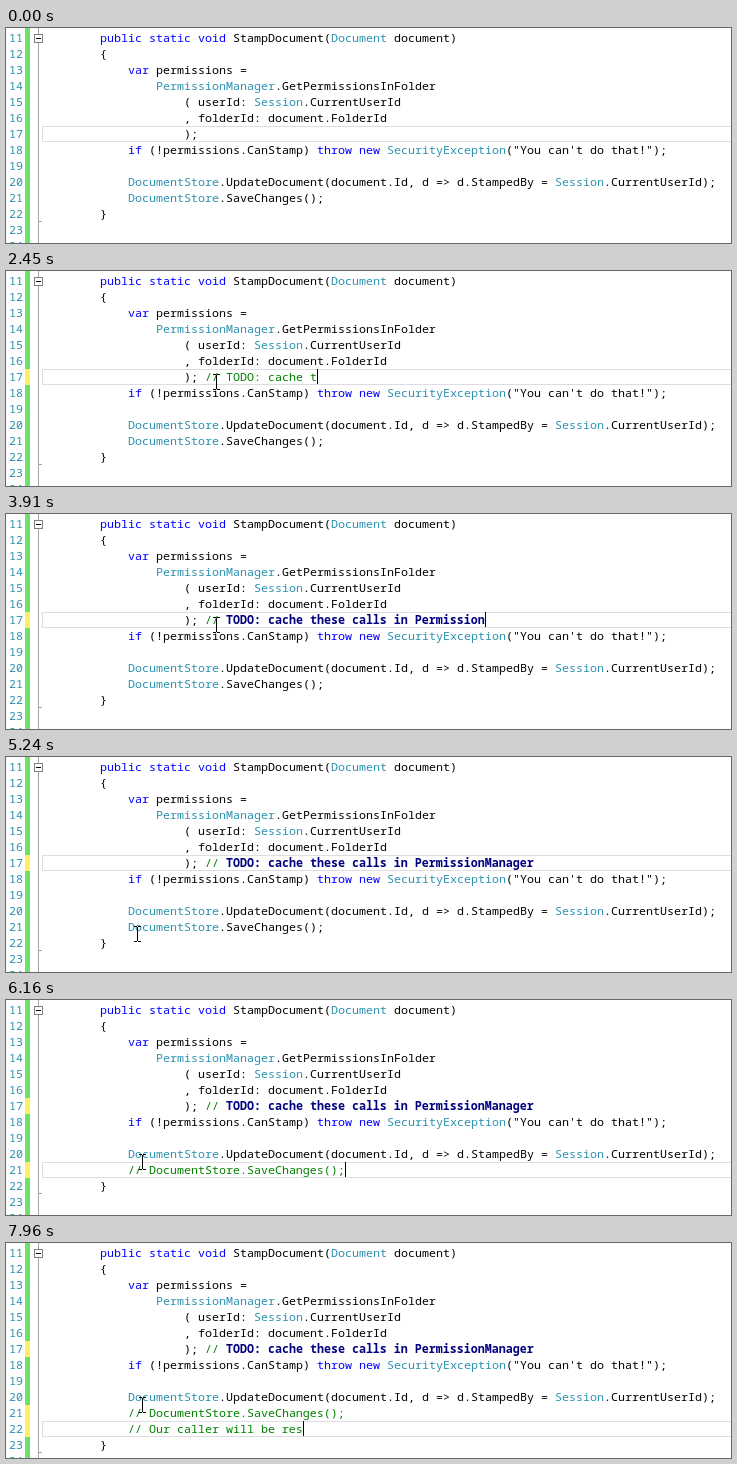
An HTML page with a canvas for the animation above (8000 ms loop, 725x215 px).

```html
<!DOCTYPE html>
<html lang="en">
<head>
<meta charset="utf-8">
<title>Code editor</title>
<style>
html, body { margin: 0; width: 100%; height: 100%; overflow: hidden; background: #fff; }
canvas { display: block; }
</style>
</head>
<body>
<canvas width="725" height="215"></canvas>
<script>
const ctx = document.querySelector('canvas').getContext('2d');
const LOOP = 8000, CHAR = 7, ROW = 16, LEFT = 38, TOP = 2;
const FONT = '11.667px "Noto Sans Mono", "DejaVu Sans Mono", monospace';
const TEAL = '#2b91af', BLUE = '#0000ff', GREEN = '#008000', NAVY = '#000080';

const COLORS = {};
for (const word of 'public static void var if throw new'.split(' ')) COLORS[word] = BLUE;
for (const word of 'Document PermissionManager Session SecurityException DocumentStore'.split(' ')) COLORS[word] = TEAL;

// [column, code], from line 11 on
const CODE = [
  [8, 'public static void StampDocument(Document document)'],
  [8, '{'],
  [12, 'var permissions ='],
  [16, 'PermissionManager.GetPermissionsInFolder'],
  [20, '( userId: Session.CurrentUserId'],
  [20, ', folderId: document.FolderId'],
  [20, ');'],
  [12, 'if (!permissions.CanStamp) throw new SecurityException("You can\'t do that!");'],
  [12, ''],
  [12, 'DocumentStore.UpdateDocument(document.Id, d => d.StampedBy = Session.CurrentUserId);'],
];
const SAVE = 'DocumentStore.SaveChanges();';
const TODO = ' // TODO: cache these calls in PermissionManager';
const NOTE = '// Our caller will be res';
const TODO_ROW = 6, SAVE_ROW = 10;

// Bursts of typing: [first key, last key, number of keys]
const TODO_KEYS = keyTimes([[620, 920, 3], [1070, 1400, 5], [1660, 2300, 8], [2420, 2990, 13],
  [3080, 3160, 2], [3230, 3850, 10], [3960, 4010, 2], [4060, 4390, 5]]);
const NOTE_KEYS = keyTimes([[6420, 7080, 9], [7140, 7930, 15], [7960, 7960, 1]]);
const CLICK = 5600, COMMENT = 5860, RECOLOR = 6100, ENTER = 6310, RETAG = 45;

// Mouse path: [time, x, y]
const MOUSE = [[30, 497, 188], [130, 340, 142], [230, 183, 108], [330, 210, 111], [4890, 210, 111],
  [5240, 131, 177], [5400, 190, 204], [5640, 386, 188], [5790, 386, 188], [5900, 150, 155], [5940, 136, 162]];

function keyTimes(bursts) {
  return bursts.flatMap(([from, to, n]) =>
    Array.from({ length: n }, (_, i) => from + (to - from) * i / Math.max(1, n - 1)));
}

const typed = (keys, t) => keys.filter(key => key <= t).length;

function rect(x, y, w, h, color) {
  ctx.fillStyle = color;
  ctx.fillRect(x, y, w, h);
}

function text(str, x, row, color, bold = false) {
  ctx.font = (bold ? 'bold ' : '') + FONT;
  ctx.fillStyle = color;
  ctx.fillText(str, x, 14 + ROW * row);
}

const colX = col => LEFT + CHAR * col;

function code(str, col, row) {
  for (const token of str.match(/\w+|\W+/g) || []) {
    text(token, colX(col), row, COLORS[token] || '#000');
    col += token.length;
  }
}

function gutter(changedRows, endRow) {
  rect(19, 0, 5, 215, '#6ce26c');
  for (const row of changedRows) rect(19, TOP + ROW * row, 5, ROW, '#ffee62');
  for (let row = 0; row < 14; row++) text(String(11 + row), 3, row, TEAL);
  const grey = '#a5a5a5';
  rect(32, 0, 1, 215, grey);
  rect(32, TOP + ROW * endRow + 15, 4, 1, grey);
  rect(28, 6, 9, 9, '#808080');
  rect(29, 7, 7, 7, '#fff');
  rect(30, 10, 5, 1, '#000');
}

function currentLine(row) {
  ctx.strokeStyle = '#dcdce2';
  ctx.strokeRect(36.5, TOP + ROW * row + 0.5, 690, 15);
}

function caret(col, row) {
  rect(colX(col), TOP + ROW * row, 1, 15, '#000');
}

function mouse(t) {
  if (t < MOUSE[0][0]) return;
  let [, x, y] = MOUSE[MOUSE.length - 1];
  const next = MOUSE.findIndex(point => point[0] > t);
  if (next > 0) {
    const [t0, x0, y0] = MOUSE[next - 1], [t1, x1, y1] = MOUSE[next];
    const k = (t - t0) / (t1 - t0);
    x = Math.round(x0 + (x1 - x0) * k);
    y = Math.round(y0 + (y1 - y0) * k);
  }
  rect(x, y - 7, 1, 14, '#000');
  for (const end of [y - 8, y + 7]) {
    rect(x - 3, end, 3, 1, '#000');
    rect(x + 1, end, 3, 1, '#000');
  }
}

function draw(t) {
  rect(0, 0, 725, 215, '#fff');
  const todoCount = typed(TODO_KEYS, t), noteCount = typed(NOTE_KEYS, t);
  const commented = t >= COMMENT, entered = t >= ENTER;
  const endRow = SAVE_ROW + (entered ? 2 : 1);
  const activeRow = entered ? SAVE_ROW + 1 : t >= CLICK ? SAVE_ROW : TODO_ROW;

  const changed = [];
  if (todoCount) changed.push(TODO_ROW);
  if (commented) changed.push(SAVE_ROW);
  if (entered) changed.push(SAVE_ROW + 1);
  gutter(changed, endRow);
  currentLine(activeRow);

  CODE.forEach(([col, str], row) => code(str, col, row));
  code('}', 8, endRow);

  // The task tag turns bold shortly after each key
  const tagged = todoCount >= 8 && t - TODO_KEYS[todoCount - 1] >= RETAG;
  text(TODO.slice(0, Math.min(4, todoCount)), colX(22), TODO_ROW, GREEN);
  text(TODO.slice(4, Math.max(4, todoCount)), colX(26), TODO_ROW, tagged ? NAVY : GREEN, tagged);

  if (commented) text('//', colX(12), SAVE_ROW, GREEN);
  if (t >= RECOLOR) text(SAVE, colX(15), SAVE_ROW, GREEN);
  else code(SAVE, commented ? 15 : 12, SAVE_ROW);
  text(NOTE.slice(0, noteCount), colX(12), SAVE_ROW + 1, GREEN);

  const hidden = t < 330 || (t >= 1590 && t < 1660) || (t >= 4630 && t < CLICK);
  if (!hidden) {
    const col = entered ? 12 + noteCount
      : t >= CLICK ? (commented ? 15 : 12) + SAVE.length
      : 22 + todoCount;
    caret(col, activeRow);
  }
  mouse(t);
}

const start = performance.now();
function frame() {
  draw((performance.now() - start) % LOOP);
  requestAnimationFrame(frame);
}
frame();
</script>
</body>
</html>
```
